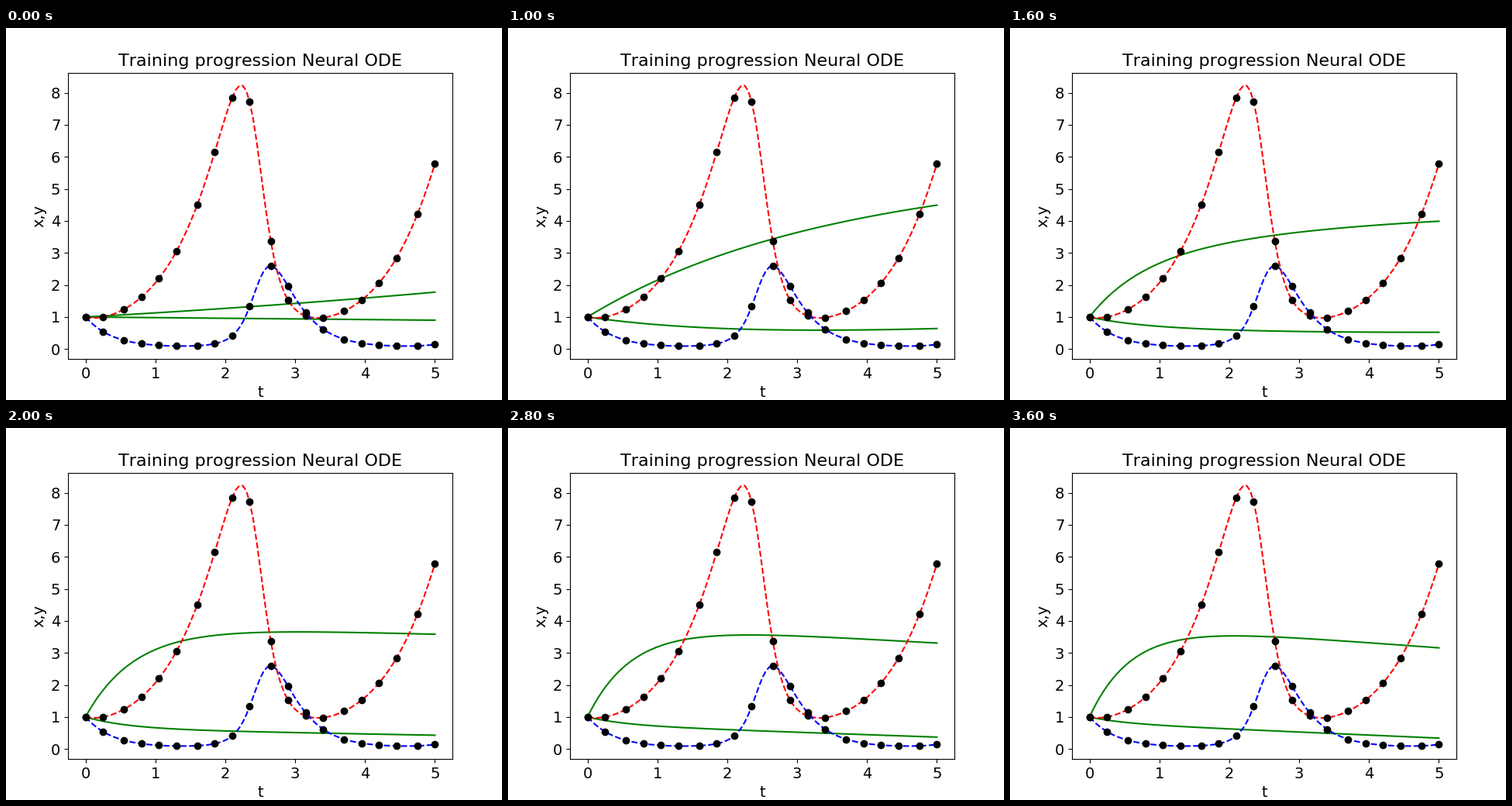
A matplotlib script for the animation above (3800 ms loop, 640 px wide and 480 px high).

```python
import numpy as np
import matplotlib.pyplot as plt
from matplotlib.animation import FuncAnimation

STEPS, STEP_MS = 19, 200
T = np.linspace(0, 5, 101)
SUB = 10  # integration steps per plotted point


def lotka_volterra(u):
    x, y = u
    return np.array([1.5 * x - 2.0 * x * y, x * y - 3.4 * y])


def rk4(f, u, h):
    k1 = f(u)
    k2 = f(u + h / 2 * k1)
    k3 = f(u + h / 2 * k2)
    k4 = f(u + h * k3)
    return u + h / 6 * (k1 + 2 * k2 + 2 * k3 + k4)


def solve():
    h = (T[1] - T[0]) / SUB
    u = np.array([1.0, 1.0])
    path = [u]
    for _ in T[1:]:
        for _ in range(SUB):
            u = rk4(lotka_volterra, u, h)
        path.append(u)
    return np.array(path).T


def relax(a, k, b):
    """Start at 1, approach 1 + a at rate k (grow if k < 0), drift by b."""
    return 1 + a * (1 - np.exp(-k * T)) + b * T


# Key poses of the predicted pair (x, y) during training
POSES = np.array([
    (relax(-1.364, -0.09, 0), relax(0, 1, -0.02)),
    (relax(-1.623, -0.175, 0), relax(0, 1, -0.081)),
    (relax(3.85, 0.325, 0.08), relax(-1.07, 0.4, 0.113)),
    (relax(2.866, 1.4, -0.056), relax(-0.37, 1.6, -0.04)),
    (relax(2.96, 1.65, -0.16), relax(-0.185, 2, -0.095)),
])


def prediction(i):
    # Learning is quick in the middle and slows towards the last pose
    s = np.interp(i, [0, 2, 5, 7, 10, 14, 18], [0, 1, 2, 2.33, 3, 3.65, 4])
    j = min(int(s), len(POSES) - 2)
    return POSES[j] + (s - j) * (POSES[j + 1] - POSES[j])


plt.rcParams["font.family"] = "DejaVu Sans"
plt.rcParams["text.kerning_factor"] = 6  # whole-pixel kerning
fig, ax = plt.subplots(figsize=(6.4, 4.8), dpi=100)
fig.subplots_adjust(left=0.125, right=0.9, bottom=0.11, top=0.88)

truth = solve()
observed = np.rint(np.linspace(0, len(T) - 1, 20)).astype(int)

pred_lines = [ax.plot(T, c, "g-", lw=1.5)[0] for c in POSES[0]]
for values, style in zip(truth, ("r--", "b--")):
    ax.plot(T, values, style, lw=1.5)
    ax.plot(T[observed], values[observed], "ko", ms=6)

pad = 0.05 * (truth.max() - truth.min())
ax.set_xlim(-0.25, 5.25)
ax.set_ylim(truth.min() - pad, truth.max() + pad)
ax.set_xticks(range(6))
ax.set_yticks(range(9))
ax.tick_params(labelsize=14)
ax.set_xlabel("t", fontsize=14)
ax.set_ylabel("x,y", fontsize=14)
ax.set_title("Training progression Neural ODE", fontsize=16)


def update(i):
    for line, values in zip(pred_lines, prediction(i)):
        line.set_ydata(values)
    return pred_lines


anim = FuncAnimation(fig, update, frames=STEPS, interval=STEP_MS,
                     repeat=True, repeat_delay=0)
plt.show()
```
